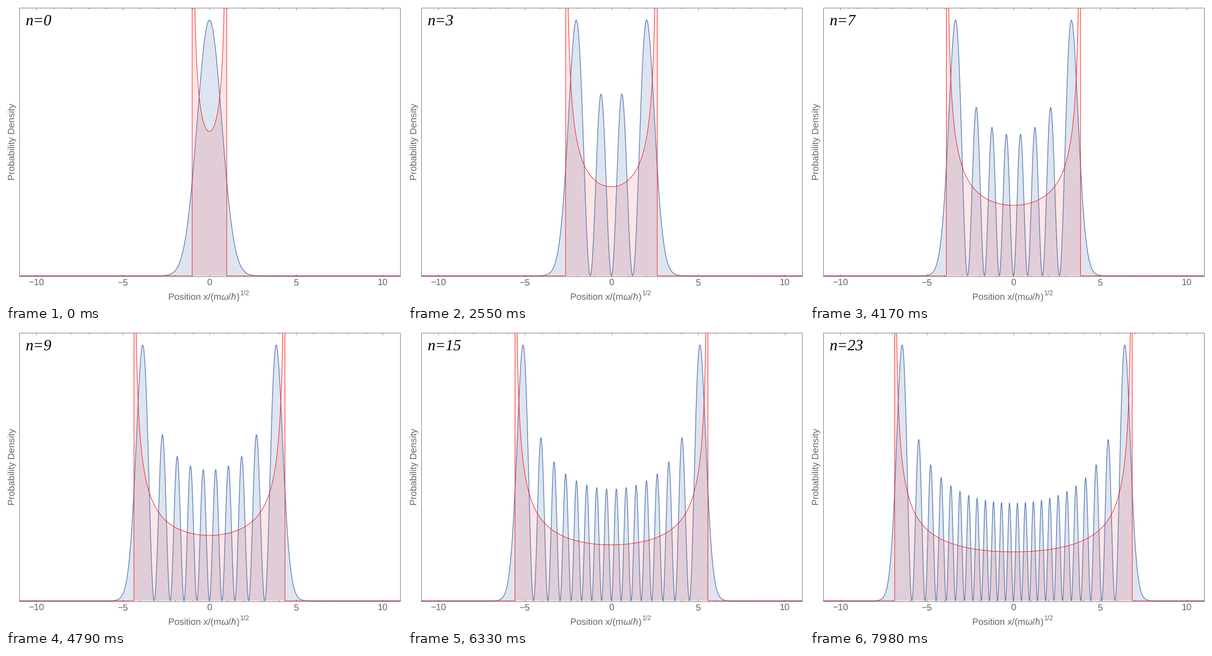
Animation of 864x648 px, one loop 8 s. Source, as a matplotlib script:

```python
import numpy as np
import matplotlib.pyplot as plt
from matplotlib.animation import FuncAnimation
from matplotlib.collections import LineCollection
from matplotlib.patches import Polygon, Rectangle

plt.rcParams["text.hinting"] = "none"

W, H = 864, 648
LEFT, RIGHT, TOP, BOTTOM = 28.5, 859.5, 3.5, 589.5
CENTER, UNIT = 443.9, 37.8      # pixel of x = 0, pixels per unit
BASE, PEAK = 588.6, 558         # pixel of zero density, height of the maximum
BLUE, RED, GRAY = "#5e81b5", "#ff0000", "#666666"
STEP = 20
LOOP = 8000
# moments at which n grows by one
CHANGES = [1260, 1990, 2550, 3020, 3440, 3820, 4170, 4490, 4790, 5080, 5350, 5610,
           5860, 6100, 6330, 6560, 6780, 6990, 7200, 7400, 7600, 7790, 7980]

fig = plt.figure(figsize=(W / 72, H / 72), dpi=72, facecolor="white")
ax = fig.add_axes([0, 0, 1, 1])
ax.set_xlim(0, W)
ax.set_ylim(H, 0)
ax.axis("off")


def label(x, y, text, size=20, font="Liberation Sans", color=GRAY, **kw):
    return ax.text(x, y, text, fontsize=size, family=font, color=color,
                   va="baseline", **kw)


def quantum_density(n, x):
    """Squared oscillator eigenfunction, by the Hermite recurrence."""
    prev, cur = np.zeros_like(x), np.pi ** -0.25 * np.exp(-x * x / 2)
    for k in range(n):
        prev, cur = cur, (np.sqrt(2 / (k + 1)) * x * cur
                          - np.sqrt(k / (k + 1)) * prev)
    return cur ** 2


def curves(n):
    """Pixel outlines of the quantum and the classical density."""
    x = np.linspace(-11, 11, 2001)
    rho = quantum_density(n, x)
    scale = PEAK / rho.max()
    quantum = np.column_stack([CENTER + UNIT * x, BASE - scale * rho])

    amp = np.sqrt(2 * n + 1)
    angle = np.linspace(-np.pi / 2, np.pi / 2, 801)
    height = scale / (np.pi * amp * np.maximum(np.cos(angle), 1e-6))
    px = CENTER + UNIT * amp * np.sin(angle)
    py = np.maximum(BASE - height, -40)
    classical = np.vstack([[LEFT, BASE], [px[0], BASE],
                           np.column_stack([px, py]),
                           [px[-1], BASE], [RIGHT, BASE]])
    return quantum, classical


STATES = [curves(n) for n in range(len(CHANGES) + 1)]

# density curves, clipped to the plot frame
window = Rectangle((LEFT, TOP), RIGHT - LEFT, BOTTOM - TOP, transform=ax.transData)


def density_artists(color, alpha, width, z):
    fill = ax.add_patch(Polygon([(0, 0), (1, 0), (1, 1)], fc=color, ec="none",
                                lw=0, alpha=alpha, zorder=z))
    line, = ax.plot([], [], color=color, lw=width, zorder=z + 2)
    fill.set_clip_path(window)
    line.set_clip_path(window)
    return fill, line


quantum_art = density_artists(BLUE, 0.2, 1.6, 1)
classical_art = density_artists(RED, 0.1, 1.0, 2)

# frame and ticks
ax.add_patch(Rectangle((LEFT, TOP), RIGHT - LEFT, BOTTOM - TOP, fill=False,
                       ec=GRAY, lw=1, zorder=5))
ticks = []
for k in range(-10, 11):
    tx = np.floor(CENTER + UNIT * k) + 0.5
    size = 5 if k % 5 == 0 else 3
    ticks += [[(tx, BOTTOM), (tx, BOTTOM - size)], [(tx, TOP), (tx, TOP + size)]]
    if k % 5 == 0:
        label(tx, 610, str(k).replace("-", "\u2212"), ha="center")
ax.add_collection(LineCollection(ticks, colors=GRAY, linewidths=0.8, zorder=5))

# axis labels
label(353.5, 641, "Position x/(m")
label(469, 641, "\u03c9", style="italic")
label(484.6, 641, "/")
label(490.4, 641, "\u0127", style="italic")
label(503, 641, ")")
label(511, 632, "1/2", 14.5)
label(18.5, 296, "Probability Density", 20.2, rotation=90, ha="right",
      rotation_mode="anchor").set(ha="center")

title = label(43, 42, "", 34, "Liberation Serif", "black", style="italic", zorder=6)


def update(i):
    n = int(np.searchsorted(CHANGES, i * STEP + STEP / 2, side="right"))
    for (fill, line), pts in zip((quantum_art, classical_art), STATES[n]):
        fill.set_xy(pts)
        line.set_data(pts[:, 0], pts[:, 1])
    title.set_text(f"n={n}")
    return *quantum_art, *classical_art, title


anim = FuncAnimation(fig, update, frames=LOOP // STEP, interval=STEP,
                     repeat=True, repeat_delay=0, blit=False)
plt.show()
```
